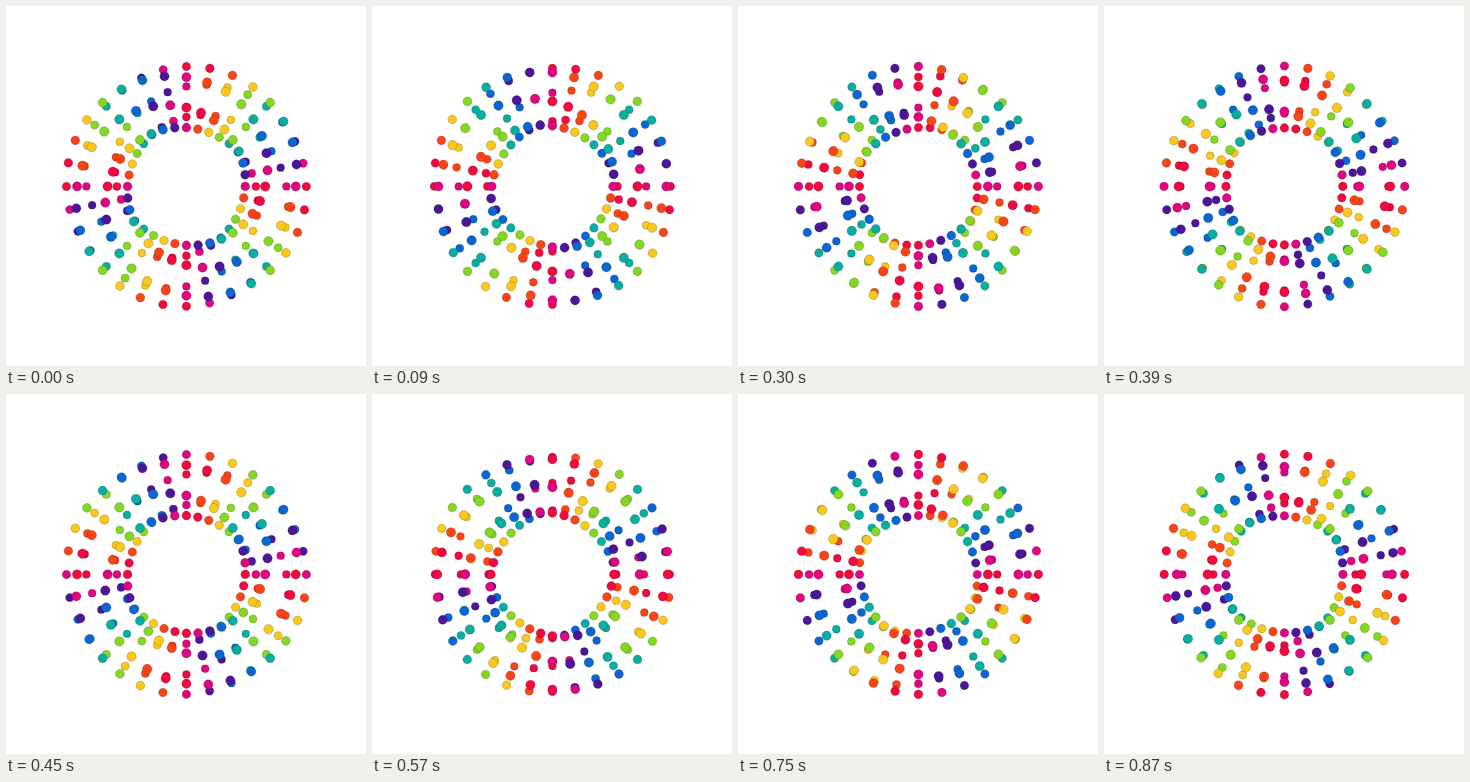
Recreate the animation shown at these times as an HTML page with a canvas. Size 360 by 360 pixels, loop 0.9 s.

```html
<!DOCTYPE html>
<html lang="en">
<head>
<meta charset="utf-8">
<title>Rolling ring of dots</title>
<style>
  html, body { margin: 0; width: 100%; height: 100%; overflow: hidden; background: #fff; }
  canvas { display: block; }
</style>
</head>
<body>
<canvas id="stage" width="360" height="360"></canvas>
<script>
const ctx = document.getElementById('stage').getContext('2d');
const COLORS = ['#e00680', '#f5083f', '#fa4418', '#fac81a', '#84d822', '#08aea0', '#0a66d2', '#4c169a'];
const LOOP = 900, STEP = 30;
const CENTER = 180.4, RING = 89.4, TUBE = 31;
const DOT = 4.35, NEARNESS = 0.1; // dots on the near side are slightly larger
const SPOKES = 32, PER_SPOKE = 6;
const rad = deg => deg * Math.PI / 180;

function draw(time) {
  const progress = Math.floor(time % LOOP / STEP) * STEP / LOOP;
  const dots = [];
  for (let spoke = 0; spoke < SPOKES; spoke++) {
    const angle = rad((spoke + 1) * 360 / SPOKES);
    const place = spoke % 8 + 1; // the pattern repeats every quarter turn
    for (let k = 0; k < PER_SPOKE; k++) {
      const phase = rad(10 - 7.5 * place + 60 * k + 120 * progress);
      const r = RING + TUBE * Math.cos(phase);
      dots.push({
        x: CENTER + r * Math.sin(angle),
        y: CENTER - r * Math.cos(angle),
        depth: Math.sin(phase),
        color: COLORS[(place + k % 2) % 8]
      });
    }
  }
  dots.sort((a, b) => b.depth - a.depth);

  ctx.fillStyle = '#fff';
  ctx.fillRect(0, 0, 360, 360);
  ctx.strokeStyle = 'rgba(0, 0, 0, 0.3)';
  ctx.lineWidth = 0.6;
  for (const { x, y, depth, color } of dots) {
    ctx.fillStyle = color;
    ctx.beginPath();
    ctx.arc(x, y, DOT * (1 - NEARNESS * depth), 0, 2 * Math.PI);
    ctx.fill();
    ctx.stroke();
  }
}

function tick() {
  draw(performance.now());
  requestAnimationFrame(tick);
}
tick();
</script>
</body>
</html>
```
